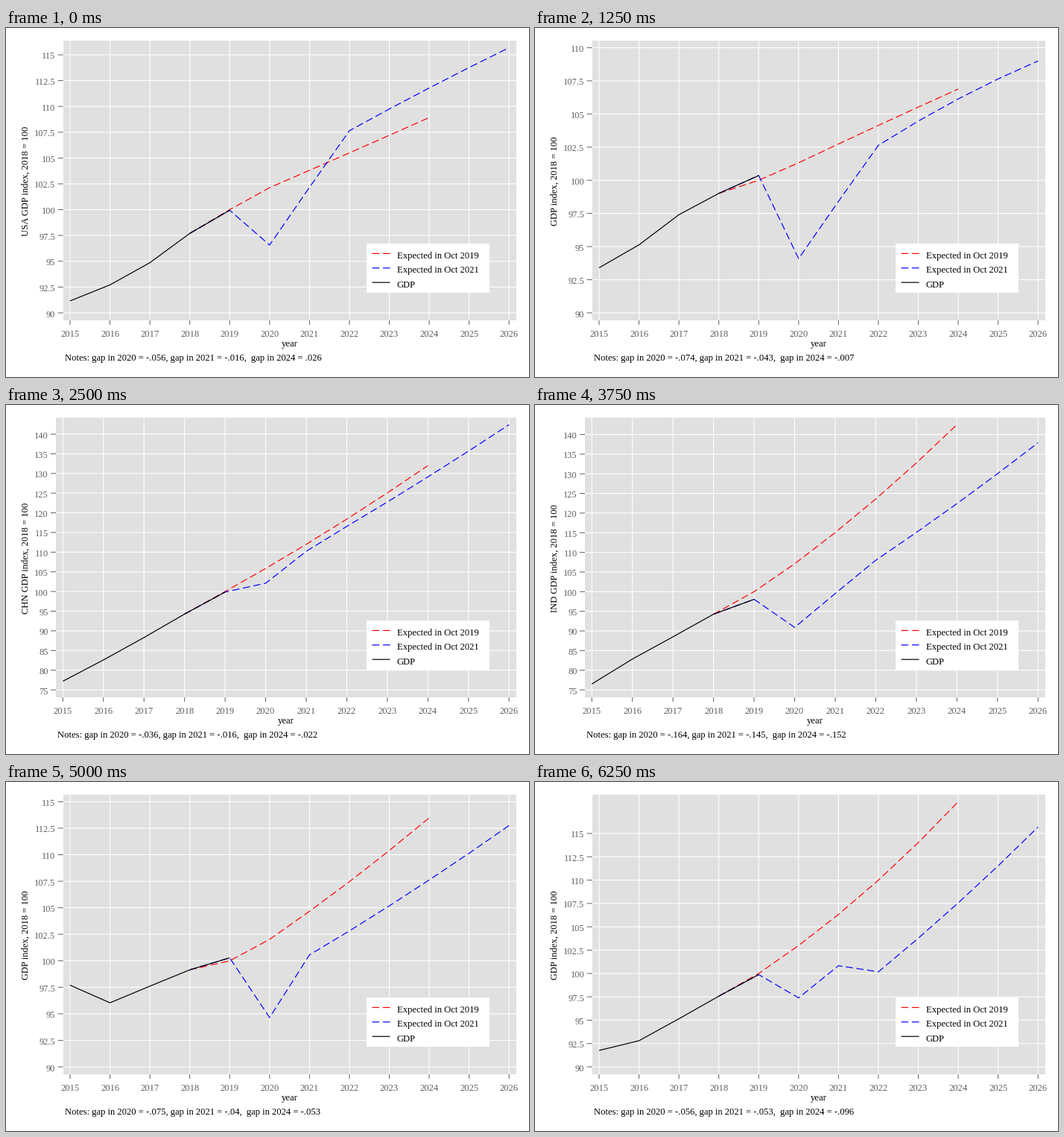
Animation, 702 px wide and 468 px high, one loop 7.5 s. Source, as a matplotlib script:

```python
import numpy as np
import matplotlib.pyplot as plt
from matplotlib.animation import FuncAnimation
from matplotlib.patches import Rectangle

plt.rcParams["font.family"] = "Liberation Serif"
plt.rcParams["lines.scale_dashes"] = False

W, H, DPI = 702, 468, 72          # at 72 dpi one point is one pixel
TOP, BOTTOM, RIGHT = 17, 392, 685
PAD = 9.3                         # space between plot edge and data
Y_TOP, Y_BASE, X_END = 26.4, 382, 675.2
RED, BLUE, GRAY = "#ff0000", "#0000ff", "#606060"
DASH = (0, (9.6, 4.8))


def curve(keys):
    """Five yearly values on the parabola through years 0, 2 and 4."""
    return list(np.polyval(np.polyfit([0, 2, 4], keys, 2), np.arange(5)))


def panel(name, high, gdp, old_keys, new_keys, gaps):
    """The old forecast is a parabola from 2020 to 2024. The printed log gaps
    place the new one against it in 2020, 2021 and 2024; new_keys gives its
    values in 2022 and 2026."""
    old = curve(old_keys)
    in20, in21, in24 = [old[k] * np.exp(float(g))
                        for k, g in zip((0, 1, 4), gaps)]
    new = [in20, in21] + curve([new_keys[0], in24, new_keys[1]])
    return dict(name=name, high=high, gaps=gaps, gdp=gdp,
                old=[gdp[3], 100] + old, new=gdp[3:] + new)


PANELS = [
    panel("USA ", 115, [91.16, 92.71, 94.86, 97.7, 99.94],
          [102.13, 105.5, 108.92], [107.65, 115.69], ("-.056", "-.016", ".026")),
    panel("", 110, [93.4, 95.13, 97.4, 99.01, 100.36],
          [101.32, 104.14, 106.88], [102.64, 109], ("-.074", "-.043", "-.007")),
    panel("CHN ", 140, [77.2, 82.6, 88.3, 94.26, 99.86],
          [105.85, 118.4, 132], [116.55, 142.4], ("-.036", "-.016", "-.022")),
    panel("IND ", 140, [76.5, 82.85, 88.5, 94.26, 98.05],
          [107.1, 123.6, 142.5], [108, 137.9], ("-.164", "-.145", "-.152")),
    panel("", 115, [97.7, 96.04, 97.61, 99.15, 100.28],
          [102.02, 107.46, 113.48], [102.82, 112.75], ("-.075", "-.04", "-.053")),
    panel("", 115, [91.76, 92.8, 95.15, 97.57, 99.88],
          [103, 110, 118.4], [100.18, 115.68], ("-.056", "-.053", "-.096")),
]

fig = plt.figure(figsize=(W / DPI, H / DPI), dpi=DPI, facecolor="white")
ax = fig.add_axes([0, 0, 1, 1])


def box(x0, y0, x1, y1, color):
    ax.add_patch(Rectangle((x0, y0), x1 - x0, y1 - y0, fc=color, ec="none"))


def stroke(xs, ys, color, width=1.2, style="-"):
    ax.plot(xs, ys, color=color, lw=width, ls=style, snap=False,
            solid_capstyle="butt", dash_capstyle="butt")


def label(x, y, text, ha="left", color="black", size=12.6, **kw):
    ax.text(x, y, text, ha=ha, va="baseline", color=color, size=size, **kw)


def legend():
    box(484, 289, 649, 355, "white")
    rows = [("Expected in Oct 2019", RED, DASH),
            ("Expected in Oct 2021", BLUE, DASH), ("GDP", "black", "-")]
    for i, (text, color, style) in enumerate(rows):
        y = 302.4 + 19.4 * i
        stroke([491.5, 515.5], [y, y], color, style=style)
        label(524.7, y + 6.6, text)


def draw(i):
    p = PANELS[i]
    ax.clear()
    ax.axis("off")
    ax.set(xlim=(0, W), ylim=(H, 0))

    coarse = p["high"] > 120
    low, step, left = (75, 5, 67) if coarse else (90, 2.5, 76.7)
    x0 = left + PAD
    dx = (X_END - x0) / 11
    peak = max(p["high"], *p["old"], *p["new"])
    scale = (Y_BASE - Y_TOP) / (peak - low)

    def y_of(value):
        return Y_BASE - (value - low) * scale

    box(left, TOP, RIGHT, BOTTOM, "#e0e0e0")
    for tick in np.arange(low, p["high"] + step / 2, step):
        y = y_of(tick)
        stroke([left, RIGHT], [y, y], "white", 1.1)
        stroke([left - 7, left], [y, y], GRAY, 1)
        label(left - 10.3, y + 5.5, f"{tick:g}", "right", GRAY, 12.4)
    for k in range(12):
        x = x0 + k * dx
        stroke([x, x], [TOP, BOTTOM], "white", 1.1)
        stroke([x, x], [BOTTOM, BOTTOM + 6], GRAY, 1)
        label(x, 414, str(2015 + k), "center", GRAY)

    def series(values, first, color, style="-"):
        xs = x0 + dx * (first + np.arange(len(values)))
        stroke(xs, [y_of(v) for v in values], color, style=style)

    series(p["old"], 3, RED, DASH)
    series(p["new"], 3, BLUE, DASH)
    series(p["gdp"], 0, "black")
    legend()

    label(30, 205, p["name"] + "GDP index, 2018 = 100", "center",
          rotation=90, rotation_mode="anchor")
    label((left + RIGHT) / 2, 427, "year", "center")
    a, b, c = p["gaps"]
    label(left + 2.3, 446,
          f"Notes: gap in 2020 = {a}, gap in 2021 = {b},  gap in 2024 = {c}")
    return []


anim = FuncAnimation(fig, draw, frames=len(PANELS), interval=1250,
                     init_func=lambda: draw(0), repeat=True, repeat_delay=0)
plt.show()
```
